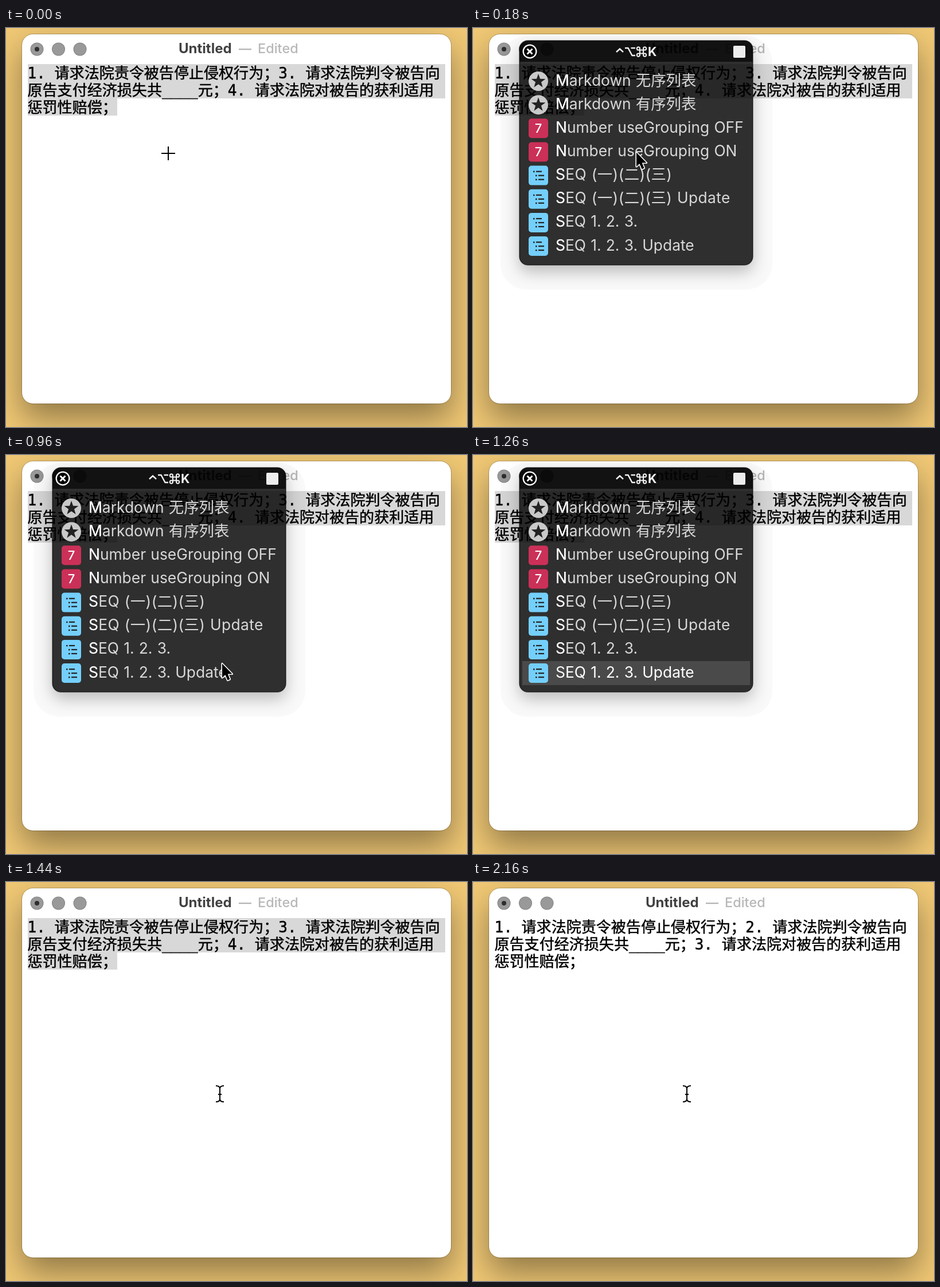
An HTML page with a canvas for the animation above (2220 ms loop, 804x697 px).

```html
<!DOCTYPE html>
<html lang="zh-CN">
<head>
<meta charset="utf-8">
<style>
html, body { margin: 0; width: 100%; height: 100%; overflow: hidden; background: #f0c875; }
canvas { display: block; width: 804px; height: 697px; }
</style>
</head>
<body>
<canvas id="stage" width="804" height="697"></canvas>
<script>
const ctx = document.getElementById('stage').getContext('2d');
const LOOP = 2220, STEP = 60;
const OPEN = 180, MOVE_FROM = 520, MOVE_TO = 960, PRESS = 1260, CLOSE = 1440, RENUMBER = 1680, CARET_OFF = 2160;

const UI = 'Inter, "Noto Sans CJK SC", "Noto Sans CJK", sans-serif';
const MONO = '"DejaVu Sans Mono", "Noto Sans CJK SC", "Noto Sans CJK", monospace';
const ROWS = [
  ['star', 'Markdown 无序列表'],
  ['star', 'Markdown 有序列表'],
  ['seven', 'Number useGrouping OFF'],
  ['seven', 'Number useGrouping ON'],
  ['list', 'SEQ (一)(二)(三)', '0.4px'],
  ['list', 'SEQ (一)(二)(三) Update', '0.4px'],
  ['list', 'SEQ 1. 2. 3.'],
  ['list', 'SEQ 1. 2. 3. Update']
];

function text(str, x, y, font, color, align = 'left') {
  ctx.font = font;
  ctx.fillStyle = color;
  ctx.textAlign = align;
  ctx.fillText(str, x, y);
}

function rect(x, y, w, h, color) {
  ctx.fillStyle = color;
  ctx.fillRect(x, y, w, h);
}

function round(x, y, w, h, r, color) {
  ctx.beginPath();
  ctx.roundRect(x, y, w, h, r);
  ctx.fillStyle = color;
  ctx.fill();
}

function outline(x, y, w, h, r, color, width) {
  ctx.beginPath();
  ctx.roundRect(x, y, w, h, r);
  ctx.strokeStyle = color;
  ctx.lineWidth = width;
  ctx.stroke();
}

function disc(x, y, r, color) {
  ctx.beginPath();
  ctx.arc(x, y, r, 0, Math.PI * 2);
  ctx.fillStyle = color;
  ctx.fill();
}

function line(points, color, width) {
  ctx.beginPath();
  points.forEach(([x, y]) => ctx.lineTo(x, y));
  ctx.strokeStyle = color;
  ctx.lineWidth = width;
  ctx.stroke();
}

function shadow(color, blur, dy) {
  ctx.shadowColor = color;
  ctx.shadowBlur = blur;
  ctx.shadowOffsetY = dy;
}

function drawWindow() {
  rect(0, 0, 804, 697, '#f0c875');
  ctx.save();
  shadow('rgba(0,0,0,.4)', 56, 26);
  round(28, 11, 748, 645, 19, '#fff');
  ctx.restore();
  outline(27.5, 10.5, 749, 646, 19.5, 'rgba(0,0,0,.2)', 1);

  for (const x of [54, 91.5, 129]) {
    disc(x, 37, 11.5, '#858585');
    disc(x, 37, 10.5, '#999');
  }
  disc(54, 37, 4, '#2e2e2e');
  text('Untitled', 301, 44, `700 24px ${UI}`, '#404040');
  text('—', 406, 44, `600 22px ${UI}`, '#b5b5b5');
  text('Edited', 439, 44, `500 23.5px ${UI}`, '#b8b8b8');
}

function drawDocument(t) {
  const done = t >= RENUMBER;
  if (!done) {
    rect(38, 63, 728, 60, '#d8d8d8');
    rect(38, 123, 156, 30, '#d8d8d8');
  }
  const [second, third] = done ? [2, 3] : [3, 4];
  ctx.strokeStyle = '#000';
  ctx.lineWidth = 0.5;
  [
    `1. 请求法院责令被告停止侵权行为；${second}. 请求法院判令被告向`,
    `原告支付经济损失共____元；${third}. 请求法院对被告的获利适用`,
    '惩罚性赔偿；'
  ].forEach((str, i) => {
    const y = 88 + 30 * i;
    text(str, 37.5, y, `500 26.06px ${MONO}`, '#000');
    ctx.strokeText(str, 37.5, y);
  });
  if (done && t < CARET_OFF) rect(195, 123, 1.5, 30, '#000');
}

const icons = {
  star(x, y) {
    disc(x, y, 17, '#c9c9c9');
    ctx.beginPath();
    for (let i = 0; i < 10; i++) {
      const a = Math.PI * (i / 5 - 0.5), r = i % 2 ? 5.2 : 13;
      ctx.lineTo(x + r * Math.cos(a), y + r * Math.sin(a));
    }
    ctx.fillStyle = '#222';
    ctx.fill();
  },
  seven(x, y) {
    round(x - 17, y - 17, 34, 34, 5, '#cb3058');
    text('7', x, y + 8, `500 22px ${UI}`, '#fff', 'center');
  },
  list(x, y) {
    round(x - 17, y - 17, 34, 34, 5, '#74cffb');
    [-9, -5, -5].forEach((dx, i) => {
      const ly = y - 7 + 7 * i;
      rect(x + dx, ly - 1, 2.5, 2.5, '#222');
      rect(x + dx + 5, ly - 1, 10, 2.2, '#222');
    });
  }
};

function drawShortcut() {
  ctx.lineJoin = 'miter';
  line([[250, 42], [256, 36.5], [262, 42]], '#f2f2f2', 2.4);
  line([[265, 35], [270.5, 35], [277.5, 48], [283, 48]], '#f2f2f2', 2.4);
  line([[275.5, 35], [283, 35]], '#f2f2f2', 2.4);
  ctx.beginPath();
  ctx.rect(291, 38.5, 6, 6);
  for (const sx of [-1, 1]) for (const sy of [-1, 1]) {
    const x = 294 + sx * 5.6, y = 41.5 + sy * 5.6;
    ctx.moveTo(x + 2.6, y);
    ctx.arc(x, y, 2.6, 0, Math.PI * 2);
  }
  ctx.lineWidth = 2;
  ctx.stroke();
  text('K', 305, 48.5, `700 21.5px ${UI}`, '#f2f2f2');
}

function drawRow([icon, label, tracking = '0px'], i, lit) {
  const y = 93 + 41.15 * i, font = `400 26.4px ${UI}`;
  icons[icon](114, y);
  ctx.save();
  ctx.wordSpacing = '0.8px';
  ctx.letterSpacing = tracking;
  text(label, 144, y + 7.5, font, lit ? '#fff' : '#d8d8d8');
  if (!lit) text(label[0], 144, y + 7.5, font, '#fff');
  ctx.restore();
}

function drawPalette(pressed) {
  ctx.save();
  ctx.beginPath();
  ctx.rect(0, 0, 804, 697);
  ctx.roundRect(81, 22, 407, 392, 15);
  ctx.clip('evenodd');
  round(48, 14, 474, 443, 45, 'rgba(0,0,0,.025)');
  shadow('rgba(0,0,0,.25)', 28, 12);
  round(81, 22, 407, 392, 15, '#000');
  ctx.restore();

  round(81, 22, 407, 37, [15, 15, 0, 0], 'rgba(0,0,0,.93)');
  round(81, 59, 407, 355, [0, 0, 15, 15], 'rgba(0,0,0,.815)');
  outline(81, 22, 407, 392, 15, 'rgba(0,0,0,.6)', 1.5);

  disc(99, 41, 12.5, '#fff');
  disc(99, 41, 10.2, '#000');
  line([[94.5, 36.5], [103.5, 45.5]], '#fff', 3);
  line([[103.5, 36.5], [94.5, 45.5]], '#fff', 3);
  drawShortcut();
  round(454, 31, 21, 21, 2, '#ededed');

  if (pressed) rect(86, 360, 397, 42, 'rgba(255,255,255,.13)');
  ROWS.forEach((row, i) => drawRow(row, i, pressed && i === ROWS.length - 1));
}

function drawArrow(x, y) {
  ctx.beginPath();
  [[1.5, 3], [1.5, 27.5], [7, 22.5], [11, 32], [15, 30.2], [11.2, 21], [19, 21]]
    .forEach(([dx, dy]) => ctx.lineTo(x + dx, y + dy));
  ctx.closePath();
  ctx.lineJoin = 'round';
  ctx.strokeStyle = '#fff';
  ctx.lineWidth = 3.2;
  ctx.stroke();
  ctx.fillStyle = '#000';
  ctx.fill();
}

function drawCross(x, y) {
  line([[x - 12, y], [x + 12, y]], '#000', 2);
  line([[x, y - 12], [x, y + 12]], '#000', 2);
}

function drawBeam(x, y) {
  ctx.beginPath();
  for (const s of [-1, 1]) {
    ctx.moveTo(x - 7, y + s * 14);
    ctx.quadraticCurveTo(x, y + s * 14, x, y + s * 9);
    ctx.quadraticCurveTo(x, y + s * 14, x + 7, y + s * 14);
  }
  ctx.moveTo(x, y - 10);
  ctx.lineTo(x, y + 10);
  ctx.moveTo(x - 3, y + 1);
  ctx.lineTo(x + 3, y + 1);
  ctx.strokeStyle = '#000';
  ctx.lineWidth = 2;
  ctx.stroke();
}

function drawPointer(t) {
  if (t < OPEN) return drawCross(283, 219);
  if (t >= CLOSE) return drawBeam(373, 370);
  if (t >= PRESS) return;
  const p = Math.min(1, Math.max(0, (t - MOVE_FROM) / (MOVE_TO - MOVE_FROM)));
  const e = p * p * (3 - 2 * p);
  drawArrow(283.5 + 92 * e, 214.5 + 147 * e);
}

function render(t) {
  drawWindow();
  drawDocument(t);
  if (t >= OPEN && t < CLOSE) drawPalette(t >= PRESS);
  drawPointer(t);
}

const start = performance.now();
function frame(now) {
  const t = Math.max(0, now - start) % LOOP;
  render(Math.floor(t / STEP) * STEP);
  requestAnimationFrame(frame);
}
render(0);
requestAnimationFrame(frame);
</script>
</body>
</html>
```
